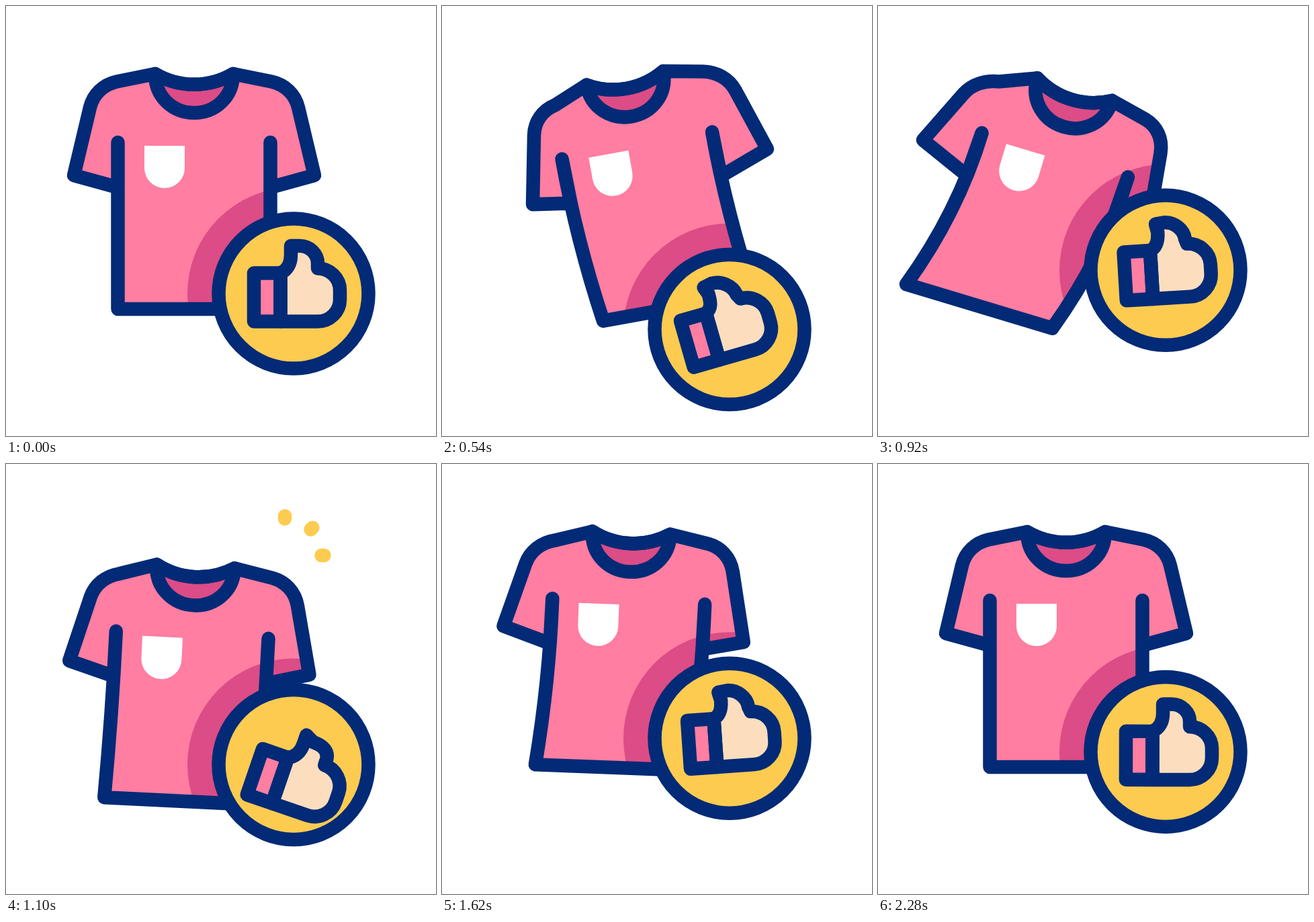
Recreate the animation shown at these times as an HTML page with a canvas. Size 640 by 640 pixels, loop 2.4 s.

```html
<!DOCTYPE html>
<html lang="en">
<head>
<meta charset="utf-8">
<title>T-shirt with thumbs up</title>
<style>
html, body { margin: 0; height: 100%; overflow: hidden; background: #fff; }
canvas { display: block; width: 640px; height: 640px; }
</style>
</head>
<body>
<canvas id="stage" width="640" height="640"></canvas>
<script>
const ctx = document.getElementById('stage').getContext('2d');
const LOOP = 2400, BEAT = 355, BADGE_DELAY = 185;
const NAVY = '#032a76', PINK = '#ff7ea1', ROSE = '#dc4c86', YELLOW = '#fdcb50', SKIN = '#fcdebe';

const BOUNCE = [0, 53.5, -36, 53.5, -20, 16, 0];  // height offset, one value per beat
const NOD = [0, -16, -4, 33, -4, 4, 0];           // hand angle, one value per beat
const SWING_TIMES = [0, 380, 940, 1290, 1720, 2070];
const SWING = [0, -17, 16.9, -15.2, 4.9, 0];      // shirt angle
const DRAG = [0, 33, -43, 42, -25, 0];            // sideways shift of the hem

function ease(t, start, end) {
  const p = Math.min(1, Math.max(0, (t - start) / (end - start)));
  return p * p * (3 - 2 * p);
}

// Eased path through the values; by default they are one beat apart.
function follow(t, values, times = values.map((_, i) => i * BEAT)) {
  return values.reduce((v, next, i) => v + (next - values[i - 1]) * ease(t, times[i - 1], times[i]));
}

function fill(color, path) {
  ctx.fillStyle = color;
  ctx.fill(path);
}

function circle(x, y, r) {
  const p = new Path2D();
  p.arc(x, y, r, 0, 7);
  return p;
}

function turnAround(x, y, degrees) {
  ctx.translate(x, y);
  ctx.rotate(degrees * Math.PI / 180);
  ctx.translate(-x, -y);
}

function shirtPath(turn, drag) {
  const sway = drag / 33 * (drag > 0 ? 1 : 0.6);
  const hunch = 15 * Math.abs(turn) / (Math.abs(turn) + 5);
  // Sleeves flap with the swing, and the left shoulder sinks.
  const sleeve = (x, y) => {
    const down = (y - 100) / 153, sink = x < 280 ? hunch * (1 - down) : 0;
    return [x + 20 * sway * down + sink / 2, y - 0.1 * sway * down * (x - 280) + sink];
  };
  const seam = y => drag * ((y - 203) / 248) ** 2;
  const p = new Path2D();
  p.moveTo(222, 101);
  p.lineTo(...sleeve(165, 112.5));
  p.bezierCurveTo(...sleeve(145, 117), ...sleeve(130, 131), ...sleeve(125, 151));
  p.lineTo(...sleeve(101, 252));
  p.lineTo(166.5 + seam(270), 270);
  p.lineTo(166.5, 203);
  p.quadraticCurveTo(166.5, 327, 166.5 + drag, 451);
  p.lineTo(393.5 + drag, 451);
  p.quadraticCurveTo(393.5, 327, 393.5, 203);
  p.lineTo(393.5 + seam(270), 270);
  p.lineTo(...sleeve(459, 252));
  p.lineTo(...sleeve(435, 151));
  p.bezierCurveTo(...sleeve(430, 131), ...sleeve(415, 117), ...sleeve(395, 112.5));
  p.lineTo(338, 101);
  p.bezierCurveTo(302, 122, 258, 122, 222, 101);
  p.closePath();
  return p;
}

const collar = new Path2D('M222 101C258 122 302 122 338 101C338 136 311 159 280 159S222 136 222 101Z');
const pocket = new Path2D('M206 208H266V241A30 30 0 0 1 206 241Z');
const cuff = new Path2D('M369 397.5H408.5V469.5H369Z');

// The thumb leans back when the hand tips left and flattens when it tips right.
function handPath(turn) {
  const lean = Math.max(0, Math.min(8, -1.5 * turn));
  const top = 357 + Math.max(0, turn) * 0.35;
  return new Path2D(`M408.5 397.5C419 393 ${424 - lean / 2} 383 ${424 - lean / 2} 371
    L${424 - lean} ${357 + lean * 0.3}L${437 - lean} ${top}
    C${452 - lean} ${top} ${464 - lean * 0.7} 369 ${464 - lean * 0.5} 383L464 390.5
    C482 390.5 497 405 497 423V437C497 455 482 469.5 464 469.5H408.5Z`);
}

function drawShirt(t, badgeY) {
  const turn = follow(t, SWING, SWING_TIMES);
  const shirt = shirtPath(turn, follow(t, DRAG, SWING_TIMES));
  ctx.save();
  ctx.translate(0, follow(t, BOUNCE));
  turnAround(280, 145, turn);
  fill(PINK, shirt);

  // The badge shadow stays in stage coordinates, clipped to the shirt.
  ctx.save();
  ctx.clip(shirt);
  ctx.resetTransform();
  fill(ROSE, circle(428, badgeY, 158));
  ctx.restore();

  fill('#fff', pocket);
  fill(ROSE, collar);
  ctx.stroke(shirt);
  ctx.stroke(collar);
  ctx.restore();
}

function drawBadge(t, y) {
  const disc = circle(428, y, 111.5);
  fill(YELLOW, disc);
  ctx.stroke(disc);

  const turn = follow(t - BADGE_DELAY, NOD), hand = handPath(turn);
  ctx.save();
  ctx.translate(Math.min(0, turn) * 0.5, y - 428 + Math.max(0, turn - 4) * 1.65);
  turnAround(428, 428, turn);
  fill(SKIN, hand);
  fill(PINK, cuff);
  ctx.stroke(hand);
  ctx.stroke(cuff);
  ctx.restore();
}

function drawSparks(t) {
  const head = ease(t, 1040, 1320), tail = ease(t, 1150, 1420);
  if (head <= tail) return;
  ctx.strokeStyle = YELLOW;
  for (let i = 0; i < 3; i++) {
    const angle = -i * Math.PI / 4;
    ctx.beginPath();
    for (const p of [tail, head]) {
      const r = 54.5 + 32 * p;
      ctx.lineTo(415 + r * Math.cos(angle), 136 + r * Math.sin(angle));
    }
    ctx.stroke();
  }
}

function draw(now) {
  const t = now % LOOP;
  const badgeY = 428 + follow(t - BADGE_DELAY, BOUNCE);
  ctx.clearRect(0, 0, 640, 640);
  ctx.lineWidth = 20.5;
  ctx.lineCap = ctx.lineJoin = 'round';
  ctx.strokeStyle = NAVY;
  drawShirt(t, badgeY);
  drawBadge(t, badgeY);
  drawSparks(t);
  requestAnimationFrame(draw);
}

requestAnimationFrame(draw);
</script>
</body>
</html>
```
